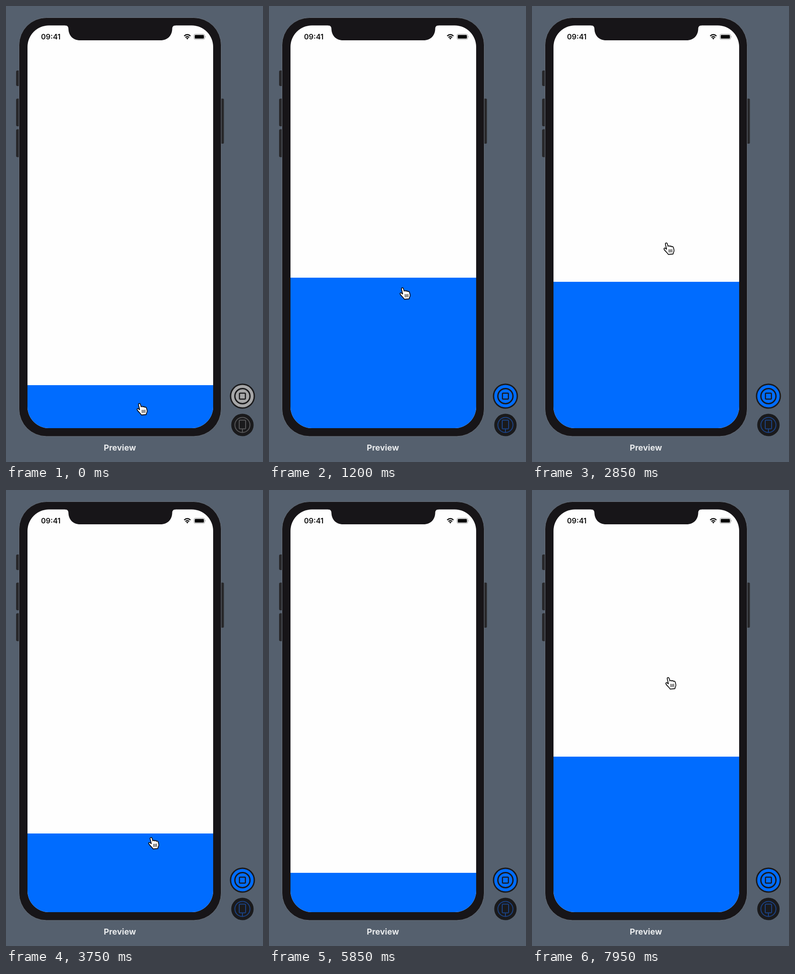
Recreate the animation shown at these times as an HTML page. Size 562 by 997 pixels, loop 8000 ms.

```html
<!DOCTYPE html>
<html lang="en">
<head>
<meta charset="utf-8">
<title>Bottom sheet preview</title>
<style>
  html, body { margin: 0; width: 100%; height: 100%; overflow: hidden; background: #55606e; }
  svg { display: block; width: 100%; height: 100%; }
  text { font-family: Inter, Roboto, sans-serif; }
  #controls { --tint: #a6a6a7; --dim: #565658; }
  #controls.live { --tint: #006cff; --dim: #1b4284; }
</style>
</head>
<body>
<svg viewBox="0 0 562 997">
  <defs>
    <clipPath id="screen"><rect x="47" y="42.500" width="406" height="880.500" rx="47"/></clipPath>
  </defs>

  <!-- Phone body -->
  <g fill="#28282b">
    <rect x="22" y="141" width="10" height="34" rx="3"/>
    <rect x="22" y="202.500" width="10" height="60.500" rx="3"/>
    <rect x="22" y="269.500" width="10" height="61" rx="3"/>
    <rect x="466" y="202.500" width="10.500" height="98.500" rx="2"/>
  </g>
  <rect x="28.500" y="25.500" width="442" height="915.500" rx="60" fill="#171518" stroke="#6b737d"/>

  <!-- Screen -->
  <g clip-path="url(#screen)">
    <rect x="47" y="42" width="406" height="882" fill="#fefefe"/>
    <rect id="sheet" x="47" width="406" height="900" fill="#006cff"/>
  </g>
  <path fill="#171518" d="M129 41V42.500C134 42.500 136.500 45 136.500 50C137 65 147 75 162 75H338C353 75 363 65 363.500 50C363.500 45 366 42.500 371 42.500V41Z"/>

  <!-- Status bar -->
  <text x="76.500" y="73" font-size="16" font-weight="600" fill="#111">09:41</text>
  <g fill="none" stroke="#111" stroke-width="2.400">
    <path d="M389.600 65.600Q396.500 59.400 403.400 65.600"/>
    <path d="M392.400 68.800Q396.500 65.200 400.600 68.800"/>
  </g>
  <path d="M396.500 73.200L393.900 70.600Q396.500 68.500 399.100 70.600Z" fill="#111"/>
  <rect x="411" y="61.500" width="23.500" height="11.500" rx="3" fill="none" stroke="#9b9b9b"/>
  <rect x="412.700" y="63.200" width="20.100" height="8.100" rx="1.500" fill="#050505"/>
  <path d="M435.700 65.300Q437.600 67.200 435.700 69.200Z" fill="#9b9b9b"/>

  <text x="249" y="972" text-anchor="middle" font-size="18" font-weight="700" fill="#e9ebed">Preview</text>

  <!-- Preview controls -->
  <g id="controls" fill="none">
    <circle cx="517" cy="853" r="27.500" fill="#1a1a1c"/>
    <circle cx="517" cy="853" r="24.500" style="fill:var(--tint)"/>
    <g stroke="#1a1a1c">
      <circle cx="517" cy="853" r="16.500" stroke-width="3"/>
      <rect x="510.500" y="846.500" width="13" height="13" rx="1.500" stroke-width="2.500"/>
    </g>
    <circle cx="517" cy="916" r="24.500" fill="#1a1a1c"/>
    <g style="stroke:var(--dim)" stroke-width="2">
      <circle cx="517" cy="916" r="16.500"/>
      <rect x="510" y="905.500" width="14" height="19" rx="2"/>
      <path d="M517 925V932"/>
    </g>
  </g>

  <!-- Pointing hand -->
  <g id="hand" stroke="#080808" stroke-linejoin="round" stroke-linecap="round">
    <path id="palm" fill="#000" stroke="none" opacity=".25" transform="translate(0 2)" d="M4.700 3.800C4.200 .8 8.200 .2 8.900 2.800L10.600 8.600C11.200 6.800 14 6.800 14.500 8.800C15.300 7.300 18 7.600 18.300 9.600C19.200 8.400 21.800 9 22.200 11L23.500 16C24.200 19.500 22.500 21 22 23L21.500 25.200L11 26C9.500 22.500 4.500 19.500 1.800 15C.8 12.600 3 11.400 5 13L7.300 14.700Z"/>
    <path id="outline" fill="#fff" stroke-width="1.700"/>
    <path fill="none" stroke-width="1.300" d="M12.600 15.500L12.900 21.500M15.700 15.300L16 21.300M18.800 15.100L19 21.100"/>
  </g>
</svg>
<script>
const DURATION = 8000, STEP = 50;
const COLLAPSED = 837, EXPANDED = 594;
const byId = id => document.getElementById(id);
const sheet = byId('sheet'), hand = byId('hand'), controls = byId('controls');
byId('outline').setAttribute('d', byId('palm').getAttribute('d'));

// Each key: time, then values.
const sheetKeys = [
  [-60, COLLAPSED], [500, EXPANDED],
  [1200, EXPANDED], [1979, COLLAPSED],
  [2300, COLLAPSED], [2921, EXPANDED],
  [3450, EXPANDED], [3950, COLLAPSED],
  [4200, COLLAPSED], [4650, EXPANDED],
  [5100, EXPANDED], [5550, COLLAPSED],
  [7450, COLLAPSED], [7950, 583]
];
const handKeys = [
  [0, 285, 868], [350, 289, 640], [600, 286, 683],
  [1200, 285, 615], [1850, 279, 709], [2250, 284, 868],
  [2850, 287, 517], [3400, 300, 610], [3850, 312, 780],
  [4150, 322, 868], [4500, 333, 600], [4750, 333, 639],
  [5100, 333, 642], [5250, 335, 930], [5300, 335, 1010],
  [6100, 320, 1010], [6200, 318, 953], [6900, 286, 860],
  [7400, 288, 868], [7950, 291, 409]
];

function sample(keys, time) {
  const next = keys.findIndex(key => key[0] > time);
  if (next < 0) return keys.at(-1).slice(1);
  const from = keys[next - 1], to = keys[next];
  const p = (time - from[0]) / (to[0] - from[0]);
  const eased = p * p * (3 - 2 * p);
  return from.slice(1).map((value, i) => value + (to[i + 1] - value) * eased);
}

function draw(time) {
  sheet.setAttribute('y', Math.round(sample(sheetKeys, time)[0]));
  hand.setAttribute('transform', `translate(${sample(handKeys, time)})`);
  controls.classList.toggle('live', time >= STEP);
}

const start = performance.now();
function tick() {
  const elapsed = (performance.now() - start) % DURATION;
  draw(Math.floor(elapsed / STEP) * STEP);
  requestAnimationFrame(tick);
}
tick();
</script>
</body>
</html>
```
